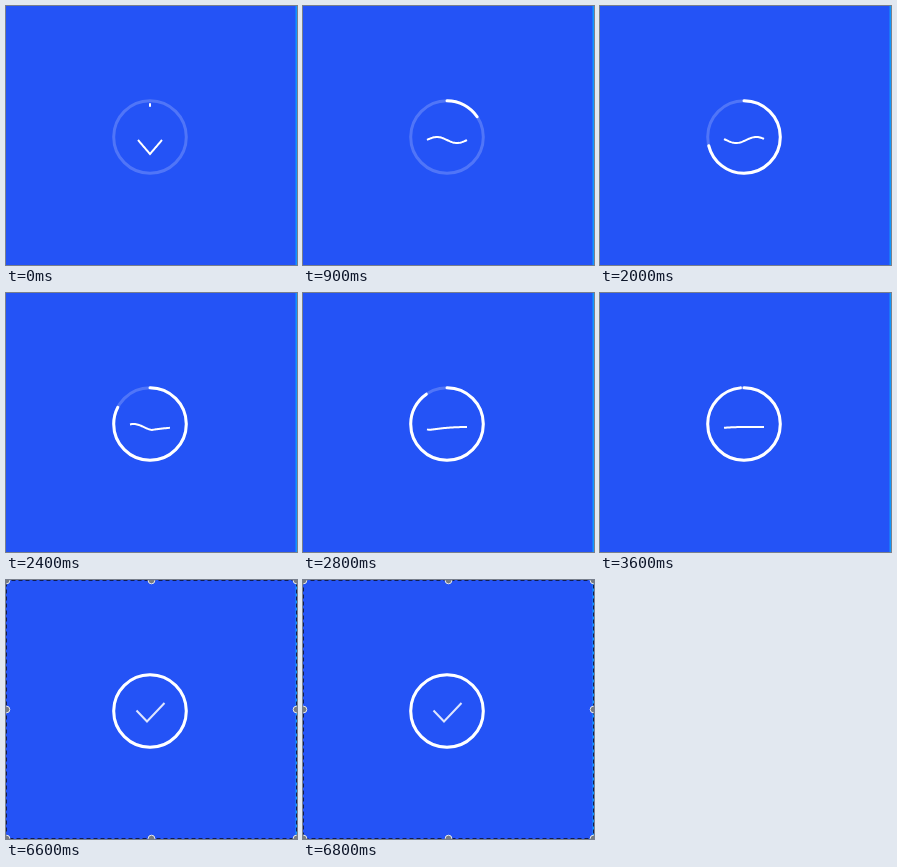
These frames come from a looping animation (291 by 259 pixels, 7800 ms). An HTML page with a canvas:

```html
<!DOCTYPE html>
<html lang="en">
<head>
<meta charset="utf-8">
<title>Download progress</title>
<style>
html, body { margin: 0; width: 100%; height: 100%; overflow: hidden; background: #2453f6; }
canvas { display: block; }
</style>
</head>
<body>
<canvas id="stage" width="291" height="259"></canvas>
<script>
const W = 291, H = 259, LOOP = 7800, STEP = 100;
const CX = 144, CY = 131, R = 36.3, BASE = 134;
const LEFT = 124, RIGHT = 164;
const ctx = document.getElementById('stage').getContext('2d');

const clamp = v => Math.min(1, Math.max(0, v));
const mix = (a, b, k) => a + (b - a) * k;
const smooth = k => k * k * (3 - 2 * k);
const span = (t, from, to) => clamp((t - from) / (to - from));

// cubic-bezier(.25, .1, .25, 1)
function ease(x) {
  const bez = (a, b, s) => 3 * a * (1 - s) ** 2 * s + 3 * b * (1 - s) * s * s + s ** 3;
  let lo = 0, hi = 1;
  for (let i = 0; i < 24; i++) {
    const mid = (lo + hi) / 2;
    if (bez(.25, .25, mid) < x) lo = mid; else hi = mid;
  }
  return bez(.1, 1, lo);
}

function stroke(points, width, color = '#fff') {
  ctx.beginPath();
  points.forEach(([x, y]) => ctx.lineTo(x, y));
  ctx.lineWidth = width;
  ctx.strokeStyle = color;
  ctx.stroke();
}

function ring(amount, color) {
  ctx.beginPath();
  ctx.arc(CX, CY, R, -Math.PI / 2, -Math.PI / 2 + amount * Math.PI * 2);
  ctx.lineWidth = 3;
  ctx.strokeStyle = color;
  ctx.stroke();
}

// A long ripple that slides left and tapers into a flat line
function ripple(u) {
  if (u < 352) return 3 * Math.cos((u - 193) / 40.3 * Math.PI * 2);
  return 3 * clamp(1 - (u - 352) / 38) ** 2;
}

function drawWave(t, progress) {
  const open = smooth(span(t, 300, 700));
  const half = mix(12, 20, open);
  const points = [];
  for (let i = 0; i <= 40; i++) {
    const k = i / 20 - 1;
    const x = CX + k * half;
    const chevron = 14 * (1 - Math.abs(k));
    points.push([x, BASE + mix(chevron, ripple(x + 250 * progress), open)]);
  }
  stroke(points, 2);
}

function drawCheck(t) {
  const k = smooth(span(t, 4300, 4800));
  const from = [[LEFT, BASE], [CX, BASE], [RIGHT, BASE]];
  const to = [[130.5, 130.5], [141, 141.5], [158.5, 123]];
  const points = from.map(([x, y], i) => [mix(x, to[i][0], k), mix(y, to[i][1], k)]);
  stroke(points, 2, `rgba(255,255,255,${1 - .15 * k})`);
}

function drawSelection(offset) {
  ctx.save();
  ctx.lineWidth = 1;
  ctx.setLineDash([4, 3]);
  ctx.lineDashOffset = offset;
  ctx.strokeStyle = '#101c50';
  ctx.strokeRect(.5, .5, W - 1, H - 1);
  ctx.setLineDash([]);
  for (const x of [.5, 145.5, 290.5]) {
    for (const y of [.5, 129.5, 258.5]) {
      if (x === 145.5 && y === 129.5) continue;
      ctx.beginPath();
      ctx.arc(x, y, 3.3, 0, Math.PI * 2);
      ctx.fillStyle = '#777b80';
      ctx.fill();
      ctx.strokeStyle = '#e6e8ec';
      ctx.stroke();
    }
  }
  ctx.restore();
}

function draw(t) {
  ctx.fillStyle = '#2453f6';
  ctx.fillRect(0, 0, W, H);
  ctx.fillStyle = '#1296ff';
  ctx.fillRect(289.5, 0, 1.5, H);

  const progress = ease(clamp((t - 380) / 3850));
  ctx.lineCap = 'butt';
  ring(1, 'rgba(255,255,255,.2)');
  if (t < 200) {
    const y = t < 100 ? 97.3 : 95;
    stroke([[CX, y], [CX, y + 3.4]], 2);
  } else {
    ctx.lineCap = 'round';
    ring(Math.max(progress, .001), '#fff');
  }

  ctx.lineCap = 'butt';
  if (t < 4300) drawWave(t, progress);
  else drawCheck(t);

  if (t >= 6600) drawSelection(t < 6800 ? 2 : 0);
}

const start = performance.now();
function tick() {
  const t = Math.max(0, performance.now() - start) % LOOP;
  draw(Math.floor(t / STEP) * STEP);
  requestAnimationFrame(tick);
}
tick();
</script>
</body>
</html>
```
